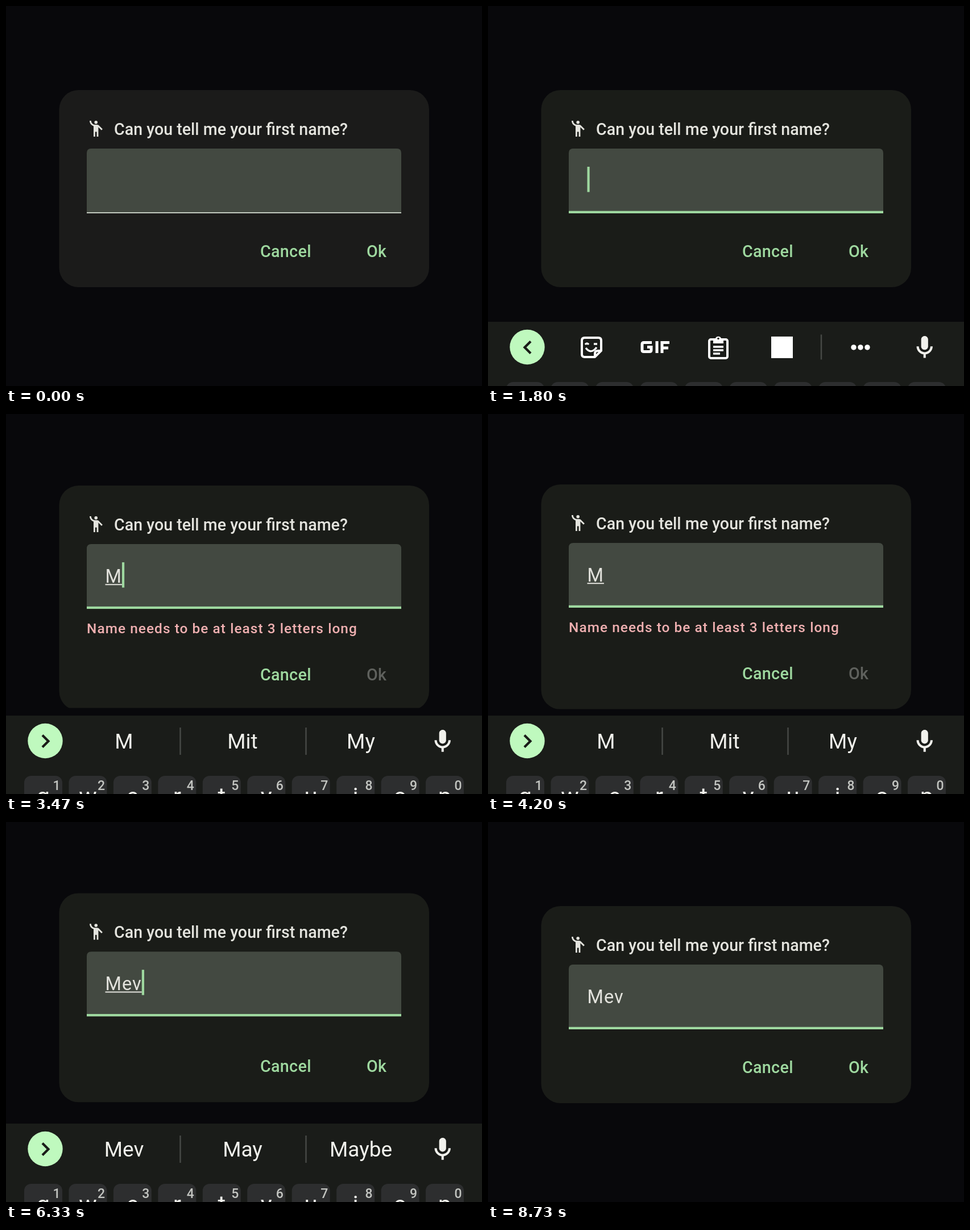
Animation of 837 by 669 pixels, one loop 8.79 s. Source, as an HTML page:

```html
<!DOCTYPE html>
<html lang="en">
<head>
<meta charset="utf-8">
<title>Name dialog</title>
<style>
  html, body { margin: 0; width: 100%; height: 100%; overflow: hidden; background: #08080b; }
  svg { display: block; width: 837px; height: 669px; }
  text { font-family: Roboto, sans-serif; fill: #e3e3dd; }
  .label { font-weight: 500; font-size: 28.6px; }
  .button { font-weight: 500; font-size: 28.7px; letter-spacing: .3px; fill: #9ed89f; }
  .word { font-size: 37px; text-anchor: middle; fill: #f1f1ec; }
  .hint { font-weight: 500; font-size: 23px; text-anchor: middle; fill: #c3c5c1; }
  .cap { font-size: 42px; text-anchor: middle; fill: #f1f1ec; }
  .stroke { fill: none; stroke: #fff; }
</style>
</head>
<body>
<svg viewBox="0 0 837 669">
  <clipPath id="windowClip"><rect id="windowRect" x="90" width="658"/></clipPath>

  <g clip-path="url(#windowClip)">
    <g id="dialog">
      <rect id="card" x="93.5" width="650.5" rx="34"/>
      <g transform="translate(141.4 51.2) scale(1.4)" fill="#e3e3dd">
        <circle cx="12" cy="4" r="2"/>
        <path d="M15.89 8.11C15.5 7.72 14.83 7 13.53 7H11C8.24 7 6 4.75 6 2H4c0 3.16 2.11 5.84 5 6.71V22h2v-6h2v6h2V10.05L18.95 14l1.41-1.41z"/>
      </g>
      <text class="label" x="190" y="79">Can you tell me your first name?</text>
      <path d="M142 217V111q0-8 8-8h537q8 0 8 8v106z" fill="#434941"/>
      <rect id="line" x="142" width="553"/>
      <text id="typed" x="174.5" y="171" font-size="32.6" letter-spacing="1"></text>
      <rect id="composing" x="174.5" y="173.2" height="2" fill="#e3e3dd"/>
      <rect id="cursor" y="135" width="4.2" height="44.5" fill="#9ed89f"/>
      <text id="error" x="142" y="259.5" font-size="24.4" font-weight="500" letter-spacing="1.05" style="fill:#f0b0b1">Name needs to be at least 3 letters long</text>
      <g id="buttons">
        <text class="button" x="447" y="0">Cancel</text>
        <text class="button" id="ok" x="634" y="0">Ok</text>
      </g>
    </g>
  </g>

  <g id="keyboard">
    <rect y="531" width="837" height="700" fill="#1a1c19"/>
    <g id="keys"></g>
    <g id="bar">
      <circle cx="69" cy="575.5" r="30.7" fill="#bff9be"/>
      <path id="chevron" fill="none" stroke="#1a1c18" stroke-width="4.2"/>
      <path transform="translate(743.4 552) scale(2.03)" fill="#f1f1ec" d="M12 14c1.66 0 3-1.34 3-3V5c0-1.66-1.34-3-3-3S9 3.34 9 5v6c0 1.66 1.34 3 3 3zm5-3c0 2.76-2.24 5-5 5s-5-2.24-5-5H5c0 3.53 2.61 6.43 6 6.92V21h2v-3.08c3.39-.49 6-3.39 6-6.92z"/>
      <g id="tools">
        <path class="stroke" stroke-width="4" stroke-linejoin="round" d="M188 593H170q-5 0-5-5V564q0-5 5-5h24q5 0 5 5v18zM199 582h-6q-5 0-5 5v6"/>
        <path class="stroke" stroke-width="3.4" d="M172 577q9 12 19-1M171 571q3-4 6 0M186 570h6"/>
        <path class="stroke" stroke-width="5" d="M288 567.5h-14q-3 0-3 3v10q0 3 3 3h10q3 0 3-3v-5h-7M297 565v21M306 586v-18.5h13M306 577h11"/>
        <rect class="stroke" x="389" y="562" width="32" height="33" rx="3" stroke-width="4"/>
        <path fill="#fff" d="M396 560h4a5.5 5.5 0 0 1 10 0h4v9h-18z"/>
        <circle cx="405" cy="560.5" r="1.8" fill="#1a1c19"/>
        <path class="stroke" stroke-width="3.5" d="M396 575h18M396 581h18M396 587h12"/>
        <rect x="498" y="557" width="38" height="38" fill="#fff"/>
        <path class="stroke" stroke-width="2.5" style="stroke:#464845" d="M586 553.5v44"/>
        <g fill="#fff"><circle cx="643" cy="576" r="4.7"/><circle cx="655" cy="576" r="4.7"/><circle cx="667" cy="576" r="4.7"/></g>
      </g>
      <g id="suggestions">
        <path class="stroke" stroke-width="2.5" style="stroke:#464845" d="M306.5 552v48M527.5 552v48"/>
        <text class="word" x="207.5" y="588.5"></text>
        <text class="word" x="416" y="588.5"></text>
        <text class="word" x="624" y="588.5"></text>
      </g>
    </g>
  </g>

  <path id="back" class="stroke" stroke-width="5" stroke-linecap="round" stroke-linejoin="round" d="M26.5 342L0 369.5l26.5 27.5"/>
</svg>
<script>
const LOOP = 8790;
const FOCUS = 1380, COMMIT = 7165;
const NAME = 'Mev';
const KEYSTROKES = [3205, 4265, 6130];
const SUGGESTIONS = [
  [3270, ['M', 'Mit', 'My']],
  [4780, ['Me', NAME, 'Maybe']],
  [6200, [NAME, 'May', 'Maybe']],
];

const el = Object.fromEntries([...document.querySelectorAll('[id]')].map(e => [e.id, e]));
const words = el.suggestions.querySelectorAll('text');

const set = (e, attrs) => { for (const k in attrs) e.setAttribute(k, attrs[k]); };
const show = (e, on) => { e.style.display = on ? '' : 'none'; };
const mix = (a, b, p) => a + (b - a) * p;
const mixColor = (a, b, p) => `rgb(${a.map((v, i) => Math.round(mix(v, b[i], p)))})`;
const progress = (t, from, to) => t <= from ? 0 : t >= to ? 1 : (t - from) / (to - from);
const smooth = (t, from, to) => { const p = progress(t, from, to); return p * p * (3 - 2 * p); };

el.keys.innerHTML = [...'qwertyuiop'].map((letter, i) => {
  const x = 32 + i * 78.45;
  return `<rect x="${x}" y="637" width="67" height="95" rx="12" fill="#2d2e2f"/>
    <text class="hint" x="${x + 57}" y="662">${(i + 1) % 10}</text>
    <text class="cap" x="${x + 33.5}" y="688">${letter}</text>`;
}).join('');

function drawDialog(t) {
  // The content resizes first; its window then recentres and clips it.
  const height = 347 + 49 * (smooth(t, 3205, 3400) - smooth(t, 6200, 6440));
  const top = 148 - 24 * (smooth(t, 3205, 3530) - smooth(t, 6300, 6530));
  set(el.windowRect, { y: top, height: 643.5 - 2 * top });
  set(el.dialog, { transform: `translate(0 ${top})` });
  set(el.card, { height, fill: mixColor([27, 27, 26], [26, 28, 24], progress(t, 70, 400)) });
  set(el.buttons, { transform: `translate(0 ${height - 53.5})` });

  const focus = progress(t, FOCUS, FOCUS + 150);
  const thickness = mix(2, 4.2, focus);
  set(el.line, { y: 217 - thickness, height: thickness, fill: mixColor([193, 201, 190], [158, 216, 159], focus) });

  const count = KEYSTROKES.filter(k => t >= k).length;
  const invalid = count === 1 || count === 2;
  el.typed.textContent = NAME.slice(0, count);
  const width = count ? el.typed.getComputedTextLength() : 0;
  set(el.composing, { width: t < COMMIT ? width : 0 });
  set(el.error, { opacity: progress(t, 3205, 3380) - progress(t, 6130, 6280) });
  el.ok.style.fill = invalid ? '#5f615d' : '';

  const lastInput = [FOCUS, ...KEYSTROKES, COMMIT].filter(k => t >= k).pop();
  set(el.cursor, { x: 174.5 + width });
  show(el.cursor, lastInput !== undefined && (t - lastInput) % 1000 < 500);
}

function drawKeyboard(t) {
  const entering = (1 - progress(t, 1530, 1930)) ** 2.75;
  const leaving = progress(t, 7200, 7470) ** 2.45;
  set(el.keyboard, { transform: `translate(0 ${560 * (entering + leaving)})` });
  const opacity = 1 - 0.8 * progress(t, 7200, 7470);
  set(el.bar, { opacity });
  set(el.keys, { opacity });

  const current = SUGGESTIONS.filter(([start]) => t >= start).pop();
  show(el.tools, !current);
  show(el.suggestions, current && t < COMMIT);
  if (current) current[1].forEach((word, i) => { words[i].textContent = word; });
  set(el.chevron, { d: current ? 'M64 565.5l10.5 10.5-10.5 10.5' : 'M75 565.5l-10.5 10.5 10.5 10.5' });
}

function drawBackArrow(t) {
  const x = mix(840, 719.5, 1 - (1 - progress(t, 6930, 7150)) ** 2);
  set(el.back, { transform: `translate(${x + 60 * smooth(t, 7290, 7450)} 0)`, opacity: 1 - progress(t, 7290, 7450) });
}

function frame(now) {
  const t = now % LOOP;
  drawDialog(t);
  drawKeyboard(t);
  drawBackArrow(t);
  requestAnimationFrame(frame);
}
frame(0);
</script>
</body>
</html>
```
